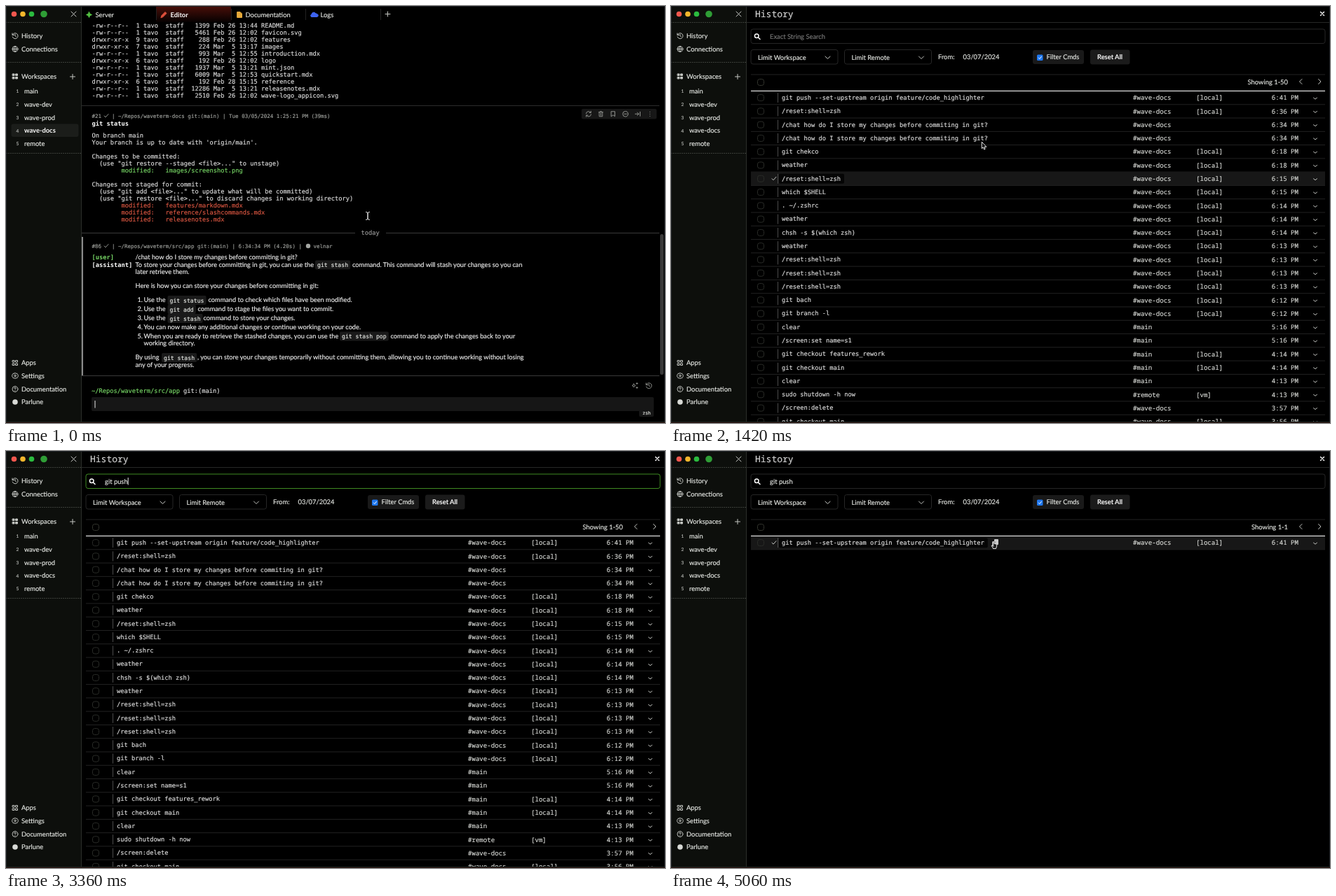
An HTML page for the animation above (5080 ms loop, 940x596 px).

```html
<!DOCTYPE html>
<html lang="en">
<head>
<meta charset="utf-8">
<title>Terminal history search</title>
<style>
  html, body { margin: 0; width: 100%; height: 100%; overflow: hidden; background: #000; }
  svg { display: block; }
  text {
    font: 9.4px Lato, sans-serif; color: #e6e8e4; fill: currentColor; white-space: pre;
    stroke: currentColor; stroke-width: .16px; text-rendering: geometricPrecision;
  }
  .mono { font: 8.72px "DejaVu Sans Mono", monospace; color: #e0e0e0; }
  .meta { font: 7.5px "DejaVu Sans Mono", monospace; color: #9c9e9a; }
  .code { font: 8.15px "DejaVu Sans Mono", monospace; }
  .side { font: 500 9.1px "Noto Sans Mono", monospace; color: #d8dad6; }
  .title { font: 500 13px "Noto Sans Mono", monospace; color: #d4d4d4; }
  .tiny { font-size: 6.5px; color: #b8bab6; }
  .chat { font-size: 9.23px; color: #f0f0f0; }
  .bold { font-weight: 700; color: #fff; stroke: none; }
  .dim { color: #777; }
  .grey { color: #999; }
  .green { color: #78d866; }
  .red { color: #de5843; }
  .icon { fill: none; stroke: #c4c6c2; stroke-width: 1; stroke-linecap: round; stroke-linejoin: round; }
  .faint { stroke: #8f918d; }
</style>
</head>
<body>
<svg id="stage" width="940" height="596" viewBox="0 0 940 596"></svg>
<script>
const LOOP = 5080, ROW_TOP = 121.5, ROW_H = 19.28, QUERY = 'git push';

// Markup helpers; text is placed by its vertical centre.
const esc = s => s.replace(/&/g, '&amp;').replace(/</g, '&lt;');
const text = (x, y, s, cls = '', extra = '') =>
  `<text x="${x}" y="${y + 3.2}" class="${cls}" ${extra}>${esc(s)}</text>`;
const rect = (x, y, w, h, fill, extra = '') =>
  `<rect x="${x}" y="${y}" width="${w}" height="${h}" fill="${fill}" ${extra}/>`;
const box = (x, y, w, h, stroke, extra = '') => rect(x, y, w, h, 'none', `rx="3" stroke="${stroke}" ${extra}`);
const rule = (x, y, w, color = '#2c2c2c') => rect(x, y, w, 1, color);
const dots = (x, y, w) => `<path d="M${x} ${y}h${w}" stroke="#3c3f3a" stroke-dasharray="2 1"/>`;
const dot = (x, y, r, fill) => `<circle cx="${x}" cy="${y}" r="${r}" fill="${fill}"/>`;
const icon = (x, y, d, cls = '', extra = '') =>
  `<path class="icon ${cls}" transform="translate(${x} ${y})" d="${d}" ${extra}/>`;
const solidIcon = (x, y, d, color) => icon(x, y, d, '', `style="fill:${color};stroke:${color}"`);
const group = (id, body) => `<g id="${id}">${body}</g>`;

const ICON = {
  cross: 'M-3.5-3.5l7 7M3.5-3.5l-7 7',
  plus: 'M-3.5 0h7M0-3.5v7',
  check: 'M-3 0l2 2 4-4.5',
  down: 'M-3.5-1.5l3.5 3.5 3.5-3.5',
  smallDown: 'M-2.5-.5l2.5 2 2.5-2',
  left: 'M1.5-3.5l-3.5 3.5 3.5 3.5',
  right: 'M-1.5-3.5l3.5 3.5-3.5 3.5',
  history: 'M-4-3.5v2.5h2.5M-3.8-1a4 4 0 1 1 0 2.5M0-2v2.2l1.5 1',
  globe: 'M4 0a4 4 0 1 1-8 0a4 4 0 1 1 8 0M-4 0h8M0-4q-3.5 4 0 8M0-4q3.5 4 0 8',
  grid: 'M-3.5-3.5h2.5v2.5h-2.5zM1-3.5h2.5v2.5h-2.5zM-3.5 1h2.5v2.5h-2.5zM1 1h2.5v2.5h-2.5z',
  gear: 'M0-4l1.2.8 1.5-.2.5 1.4 1.3.9-.5 1.1.5 1.1-1.3.9-.5 1.4-1.5-.2-1.2.8-1.2-.8-1.5.2-.5-1.4-1.3-.9.5-1.1-.5-1.1 1.3-.9.5-1.4 1.5.2zM1.3 0a1.3 1.3 0 1 1-2.6 0a1.3 1.3 0 1 1 2.6 0',
  help: 'M4 0a4 4 0 1 1-8 0a4 4 0 1 1 8 0M-1.3-1q.2-1.2 1.3-1.2t1.3 1.1q0 .8-1.3 1.3M0 2v.2',
  search: 'M2-.8a2.8 2.8 0 1 1-5.6 0a2.8 2.8 0 1 1 5.6 0M1.2 1.2l2.8 2.8',
  refresh: 'M-3.5-.5a3.5 3.5 0 0 1 6.5-1.5M3.3-4v2.2h-2.2M3.5.5a3.5 3.5 0 0 1-6.5 1.5M-3.3 4v-2.2h2.2',
  trash: 'M-3-2.5h6M-1-3.5h2M-2.3-2.5v6h4.6v-6M0-1v3',
  bookmark: 'M-2.5-3.5h5v7l-2.5-2-2.5 2z',
  minus: 'M3.8 0a3.8 3.8 0 1 1-7.6 0a3.8 3.8 0 1 1 7.6 0M-1.8 0h3.6',
  toEnd: 'M-3.5 0h5M-.5-2.2l2.2 2.2-2.2 2.2M3.5-3v6',
  more: 'M0-3v.1M0 0v.1M0 3v.1',
  star: 'M0-4l1.2 2.8 2.8 1.2-2.8 1.2-1.2 2.8-1.2-2.8-2.8-1.2 2.8-1.2z',
  sparkles: 'M-1.5-2.5l.8 1.7 1.7.8-1.7.8-.8 1.7-.8-1.7-1.7-.8 1.7-.8zM3-4v2M2-3h2M3 2v2M2 3h2',
};

function sidebar() {
  const spaces = ['main', 'wave-dev', 'wave-prod', 'wave-docs', 'remote'];
  const links = [['history', 42.5, 'History'], ['globe', 61.5, 'Connections'],
    ['grid', 510, 'Apps'], ['gear', 528.5, 'Settings'], ['help', 547.5, 'Documentation']];
  return rect(0, 0, 107, 596, '#0d0f0c') + rect(107, 0, 1, 596, '#2b2e2a') +
    dot(11.5, 11.5, 3.8, '#f2574e') + dot(24, 11.5, 3.8, '#f3b62c') + dot(36.5, 11.5, 3.8, '#2bbb3f') +
    dot(54, 11.5, 4.8, '#2f9e36') + icon(96.5, 11.5, ICON.cross) +
    dots(0, 23.5, 107) + dots(0, 80.5, 107) + dots(0, 210.5, 107) +
    links.map(([i, y, label]) => icon(13, y, ICON[i]) + text(22, y, label)).join('') +
    dot(13, 566, 3.8, '#d8dad6') + text(22, 566, 'Parlune') +
    solidIcon(13, 100.5, ICON.grid, '#c4c6c2') + text(22, 100.5, 'Workspaces') + icon(95, 101, ICON.plus) +
    group('active', rect(7.5, 168.5, 96, 18.5, '#1b1d1a', 'rx="3"')) +
    spaces.map((s, i) => {
      const y = 122 + i * 18.7;
      return text(14.5, y - .8, String(i + 1), 'tiny') + text(26, y, s, '', i === 3 ? 'id="docs"' : '');
    }).join('');
}

function editor() {
  const files = [
    ['-rw-r--r--', 1, 1399, 'Feb 26 13:44', 'README.md'], ['-rw-r--r--', 1, 5461, 'Feb 26 12:02', 'favicon.svg'],
    ['drwxr-xr-x', 9, 288, 'Feb 26 12:02', 'features'], ['drwxr-xr-x', 7, 224, 'Mar  5 13:17', 'images'],
    ['-rw-r--r--', 1, 993, 'Mar  5 12:55', 'introduction.mdx'], ['drwxr-xr-x', 6, 192, 'Feb 26 12:02', 'logo'],
    ['-rw-r--r--', 1, 1937, 'Mar  5 13:21', 'mint.json'], ['-rw-r--r--', 1, 6009, 'Mar  5 12:53', 'quickstart.mdx'],
    ['drwxr-xr-x', 6, 192, 'Feb 28 15:15', 'reference'], ['-rw-r--r--', 1, 12286, 'Mar  5 13:21', 'releasenotes.mdx'],
    ['-rw-r--r--', 1, 2510, 'Feb 26 12:02', 'wave-logo_appicon.svg']];
  const status = ['On branch main', "Your branch is up to date with 'origin/main'.", '', 'Changes to be committed:',
    '  (use "git restore --staged <file>..." to unstage)', '+images/screenshot.png', '', 'Changes not staged for commit:',
    '  (use "git add <file>..." to update what will be committed)',
    '  (use "git restore <file>..." to discard changes in working directory)',
    '!features/markdown.mdx', '!reference/slashcommands.mdx', '!releasenotes.mdx'];
  const chat = (x, y, s) => text(x, y, s, 'chat');
  const code = (x, y, s) => rect(x - 3, y - 6.5, s.length * 4.91 + 6, 13, '#1a1a1a', 'rx="2"') + text(x, y, s, 'code');
  const step = (n, y, s) => chat(187.5, y, n + '.') + chat(196.5, y, s);
  const meta = (y, id, s) => text(122.5, y - .4, id, 'meta') + icon(143, y, ICON.check, 'faint') +
    text(151, y - .4, '| ' + s, 'meta');

  const tabs = `<defs><linearGradient id="tab" x2="0" y2="1"><stop stop-color="#4a0f09"/><stop offset="1" stop-color="#060101"/></linearGradient></defs>` +
    rect(214, 0, 107, 23, 'url(#tab)') + rect(214, 0, 107, 1, '#b32a1b') +
    [214, 321, 427, 534].map(x => rect(x, 4, 1, 16, '#222')).join('') +
    solidIcon(118.5, 12.5, ICON.star, '#54c242') + text(127.5, 12.5, 'Server') +
    solidIcon(225, 12.5, 'M-4 4l1-3 5-5 2 2-5 5z', '#e0503c') + text(234.5, 12.5, 'Editor', 'bold') +
    solidIcon(333, 12.5, 'M-3-4h4l2.5 2.5v5.5h-6.5z', '#e5a93a') + text(341.5, 12.5, 'Documentation') +
    solidIcon(439.5, 12.5, 'M-3.5 3h7a2 2 0 0 0 .5-4q-1-1-2-1a3 3 0 0 0-5.5 1.5a1.8 1.8 0 0 0 0 3.5', '#3d63f0') +
    text(448.5, 12.5, 'Logs') + icon(544.5, 11.5, ICON.plus);

  const listing = files.map(([mode, n, size, date, name], i) => text(122.5, 27.5 + i * 10,
    `${mode}  ${n} tavo  staff  ${String(size).padStart(5)} ${date} ${name}`, 'mono')).join('');

  const statusLines = status.map((line, i) => {
    const y = 184.5 + i * 10, cls = { '+': 'mono green', '!': 'mono red' }[line[0]];
    return text(122.5, y, cls ? '        modified:   ' + line.slice(1) : line, cls || 'mono');
  }).join('');

  const tools = rect(821, 147, 107, 14.5, '#171717', 'rx="2"') +
    ['refresh', 'trash', 'bookmark', 'minus', 'toEnd', 'more']
      .map((k, i) => icon(831 + i * 17.5, 154.3, ICON[k], 'faint')).join('');

  const answer = text(122.5, 359, '[user]', 'mono bold green') + chat(184.5, 359, '/chat how do I store my changes before commiting in git?') +
    text(122.5, 369.5, '[assistant]', 'mono bold') +
    chat(184.5, 369.5, 'To store your changes before committing in git, you can use the') + code(444, 370, 'git stash') +
    chat(494, 369.5, 'command. This command will stash your changes so you can') +
    chat(184.5, 380, 'later retrieve them.') +
    chat(184.5, 399.5, 'Here is how you can store your changes before committing in git:') +
    step(1, 420, 'Use the') + code(233.5, 420.5, 'git status') + chat(288.5, 420, 'command to check which files have been modified.') +
    step(2, 433, 'Use the') + code(233.5, 433.5, 'git add') + chat(273.5, 433, 'command to stage the files you want to commit.') +
    step(3, 446, 'Use the') + code(233.5, 446.5, 'git stash') + chat(281.5, 446, 'command to store your changes.') +
    step(4, 459, 'You can now make any additional changes or continue working on your code.') +
    step(5, 471.5, 'When you are ready to retrieve the stashed changes, you can use the') + code(479, 472, 'git stash pop') +
    chat(548.5, 471.5, 'command to apply the changes back to your') + chat(196.5, 482, 'working directory.') +
    chat(184.5, 502, 'By using') + code(225, 502.5, 'git stash') +
    chat(273, 502, ', you can store your changes temporarily without committing them, allowing you to continue working without losing') +
    chat(184.5, 512.5, 'any of your progress.');

  return tabs + listing + rule(108, 142, 824) +
    meta(157, '#21', '~/Repos/waveterm-docs git:(main) | Tue 03/05/2024 1:25:21 PM (39ms)') + tools +
    text(122.5, 168, 'git status', 'mono bold') + statusLines +
    rule(108, 324, 390, '#3a3a3a') + rule(542, 324, 390, '#3a3a3a') + text(506.5, 324, 'today', 'mono grey') +
    rect(108, 330, 2, 198, '#8a8a8a') + rect(933, 326, 5, 201, '#3a3a3a', 'rx="2.5"') +
    meta(343, '#86', '~/Repos/waveterm/src/app git:(main) | 6:34:34 PM (4.20s) |') +
    dot(431, 343, 3.2, '#a4a6a2') + text(438.5, 342.6, 'velnar', 'meta') + answer +
    rule(108, 528, 824, '#3a3a3a') +
    text(122, 549.5, '~/Repos/waveterm/src/app', 'mono green') + text(253, 549.5, 'git:(main)', 'mono') +
    icon(897, 542.5, ICON.sparkles, 'faint') + icon(917, 542.5, ICON.history, 'faint') +
    rect(122, 559, 802, 20, '#161616', 'rx="2"') + rect(126.5, 564, 1, 10.5, '#e8e8e8') +
    rect(903, 577, 21, 10, '#161616', 'rx="2"') + text(908, 581.2, 'zsh', 'code', 'style="font-size:6.5px"');
}

const rowY = i => ROW_TOP + ROW_H * (i + .5);

function historyPage() {
  const D = '#wave-docs', L = '[local]', RESET = '/reset:shell=zsh', CHAT = '/chat how do I store my changes before commiting in git?';
  const rows = [
    ['git push --set-upstream origin feature/code_highlighter', D, L, '6:41'], [RESET, D, L, '6:36'],
    [CHAT, D, '', '6:34'], [CHAT, D, '', '6:34'], ['git chekco', D, L, '6:18'], ['weather', D, L, '6:18'],
    [RESET, D, L, '6:15'], ['which $SHELL', D, L, '6:15'], ['. ~/.zshrc', D, L, '6:14'], ['weather', D, L, '6:14'],
    ['chsh -s $(which zsh)', D, L, '6:14'], ['weather', D, L, '6:13'], [RESET, D, L, '6:13'], [RESET, D, L, '6:13'],
    [RESET, D, L, '6:13'], ['git bach', D, L, '6:12'], ['git branch -l', D, L, '6:12'], ['clear', '#main', '', '5:16'],
    ['/screen:set name=s1', '#main', '', '5:16'], ['git checkout features_rework', '#main', L, '4:14'],
    ['git checkout main', '#main', L, '4:14'], ['clear', '#main', '', '4:13'],
    ['sudo shutdown -h now', '#remote', '[vm]', '4:13'], ['/screen:delete', D, '', '3:57'], ['git checkout main', D, L, '3:56']];

  const row = ([cmd, space, remote, time], i) => {
    const y = rowY(i);
    return `<g class="row">` +
      `<g class="hover">${rect(114, y - 9.3, 819, 18.6, '#171717')}${rect(154, y - 7, cmd.length * 5.25 + 9, 14, '#050505', 'rx="2"')}` +
      icon(147, y, ICON.check) + `</g>` +
      box(123.5, y - 4.5, 9, 9, '#2a2c28') + rect(152, y - 7, 1, 14, '#4c4c4c') +
      text(158, y - .4, cmd, 'mono') + text(659, y, space, 'side') + text(749, y, remote, 'side') +
      text(895, y, time + ' PM', 'side', 'text-anchor="end"') + icon(919, y + .5, ICON.smallDown) +
      rule(114, y + 9.14, 819, '#222') + `</g>`;
  };
  const select = (x, label) => box(x, 62.5, 124, 20.5, '#262626') + text(x + 10, 74, label) + icon(x + 109.5, 73.5, ICON.down);

  return text(120, 12.5, 'History', 'title') + icon(929, 11, 'M-2.5-2.5l5 5M2.5-2.5l-5 5', '', 'style="stroke:#fff;stroke-width:1.4"') +
    rule(108, 23, 832, '#262826') +
    box(114, 33, 819, 20.5, '#262626', 'id="field"') + icon(123, 43.5, ICON.search, '', 'style="stroke:#fff;stroke-width:1.5"') +
    text(141, 43.5, '', '', 'id="query"') + rect(141, 38, 1, 10.5, '#e8e8e8', 'id="caret"') +
    select(114, 'Limit Workspace') + select(247.5, 'Limit Remote') + text(381, 73, 'From:') + text(416.5, 72.5, '03/07/2024') +
    rect(516, 63, 73, 20, '#191919', 'rx="3"') + rect(522, 69.5, 8.5, 8.5, '#1f78f0', 'rx="1.5"') +
    icon(526.3, 74, 'M-2 0l1.5 1.5 2.6-3.2', '', 'style="stroke:#fff"') + text(535.5, 73, 'Filter Cmds') +
    rect(598, 62.5, 56.5, 21, '#1b1b1b', 'rx="3"') + text(608, 72.5, 'Reset All', '', 'style="font-weight:600;color:#fff"') +
    rule(114, 97.5, 819, '#222') + box(123.5, 104.5, 9, 9, '#34362f') +
    text(880, 109, '', '', 'id="count" text-anchor="end"') +
    icon(898.5, 108, ICON.left) + icon(925, 108, ICON.right) + rows.map(row).join('') +
    rect(114, 120.8, 819, 1.3, '#d8d8d8') +
    group('copy', rect(461, 126, 6, 8, '#ccc', 'rx="1"') + rect(458, 129, 5, 7, '#999', 'rx="1"'));
}

const pointers = group('pointer',
  group('beam', icon(0, 0, 'M-2.5-5.5q2.5 0 2.5 1.5v8q0 1.5-2.5 1.5M2.5-5.5q-2.5 0-2.5 1.5v8q0 1.5 2.5 1.5', '', 'style="stroke:#e6e6e6"')) +
  group('arrow', icon(0, 0, 'M0 0v9l2-1.8 1.4 3.2 1.5-.7-1.4-3h2.7z', '', 'style="fill:#000;stroke:#fff;stroke-width:.9"')) +
  group('hand', icon(0, 0, 'M-1.5 1v-4q.8-1 1.6 0v2.5q3.4 0 3.7 1.5 0 3-1.3 5.5h-4q-1-2.5-2.5-4 .5-1.5 2.5.5z', '', 'style="fill:#222;stroke:#fff;stroke-width:.9"')));

const stage = document.getElementById('stage');
stage.innerHTML = sidebar() + group('editor', editor()) + group('history', historyPage()) +
  rect(.5, .5, 939, 600, 'none', 'stroke="#1c2024"') + rule(0, 594, 940, '#1c2420') + rule(0, 595, 940, '#2a0f0c') + pointers;

const el = Object.fromEntries([...stage.querySelectorAll('[id]')].map(node => [node.id, node]));
const rowEls = [...stage.querySelectorAll('.row')], hoverEls = [...stage.querySelectorAll('.hover')];
const show = (node, on) => { node.style.display = on ? '' : 'none'; };

// Steps run in threes: two short, one long, 140 ms together.
function stepAt(t) {
  const late = t >= 1100, u = late ? t - 1100 : t;
  const step = 3 * Math.floor(u / 140) + Math.min(2, Math.floor(u % 140 / 20));
  return late ? step + 23 : Math.min(step, 22);
}

// Pointer path: step, x, y.
const PATH = [[23, 516, 300], [28, 487, 266], [37, 356, 52], [78, 356, 52], [85, 464, 109], [90, 461, 133]];
function pointerAt(s) {
  const i = PATH.findIndex(p => s <= p[0]);
  if (i === 0) return PATH[0].slice(1);
  if (i < 0) return PATH[PATH.length - 1].slice(1);
  const [a, x0, y0] = PATH[i - 1], [b, x1, y1] = PATH[i], k = (s - a) / (b - a);
  return [x0 + (x1 - x0) * k, y0 + (y1 - y0) * k];
}

function draw(t) {
  const s = stepAt(t), inHistory = s >= 21, filtered = s >= 74, focused = s >= 39 && s < 98;
  show(el.editor, !inHistory);
  show(el.history, inHistory);
  show(el.active, !inHistory);
  el.docs.setAttribute('class', inHistory ? '' : 'bold');

  const typed = QUERY.slice(0, Math.max(0, Math.floor((s - 50) / 2.2) + 1));
  el.query.textContent = typed || 'Exact String Search';
  el.query.setAttribute('class', typed ? '' : 'dim');
  el.field.setAttribute('stroke', focused ? '#3f8a22' : '#262626');
  show(el.caret, focused);
  if (inHistory) el.caret.setAttribute('x', 141 + (typed ? el.query.getComputedTextLength() : 0));
  el.count.textContent = filtered ? 'Showing 1-1' : 'Showing 1-50';

  // Row hover trails the pointer slightly.
  const [x, y] = pointerAt(s);
  const hovered = Math.floor((pointerAt(s - 2)[1] - ROW_TOP) / ROW_H);
  rowEls.forEach((node, i) => show(node, !filtered || i === 0));
  hoverEls.forEach((node, i) => show(node, i === hovered));
  show(el.copy, filtered && hovered === 0);

  const beam = !inHistory || (y > 33 && y < 54), hand = filtered && y > 128;
  show(el.pointer, s < 50 || s >= 78);
  show(el.beam, beam);
  show(el.hand, hand);
  show(el.arrow, !beam && !hand);
  el.pointer.setAttribute('transform', `translate(${x} ${y})`);
}

const start = performance.now();
function tick() {
  draw((performance.now() - start) % LOOP);
  requestAnimationFrame(tick);
}
tick();
</script>
</body>
</html>
```
